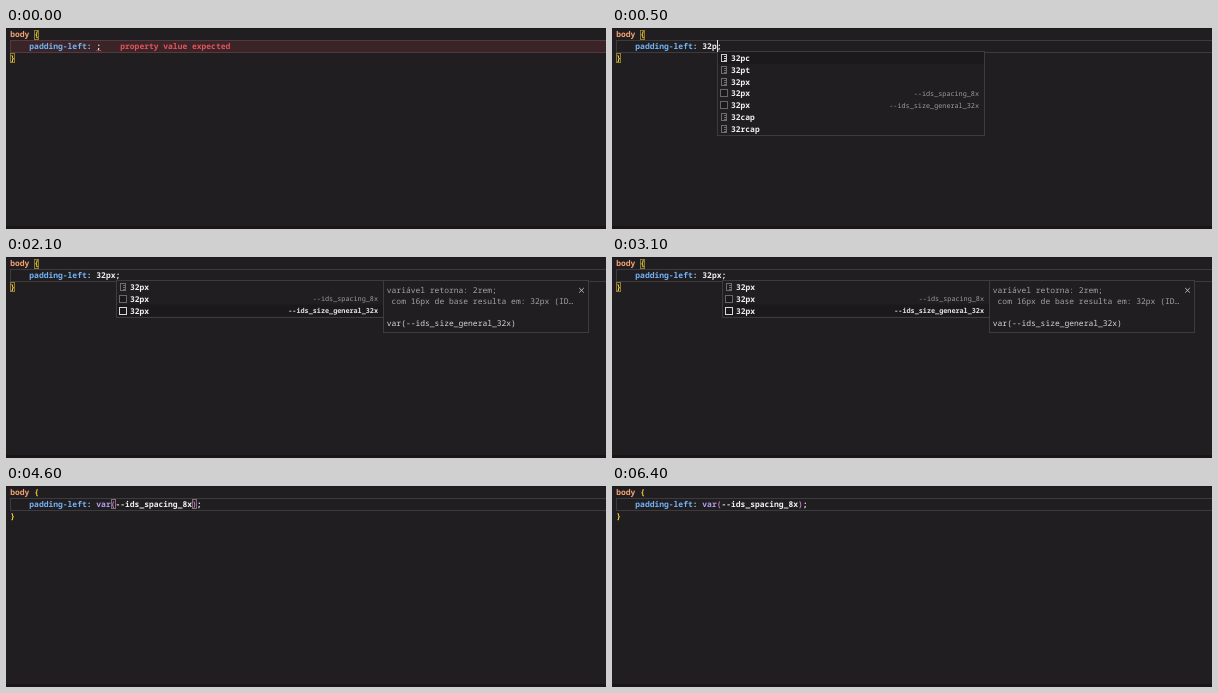
An HTML page with a canvas for the animation above (6.5 s loop, 600x201 px).

```html
<!DOCTYPE html>
<html lang="en">
<head>
<meta charset="utf-8">
<title>CSS variable completion</title>
<style>
html, body { margin: 0; width: 100%; height: 100%; overflow: hidden; background: #201e20; }
canvas { display: block; width: 600px; height: 201px; }
</style>
</head>
<body>
<canvas id="stage"></canvas>
<script>
const W = 600, H = 201, LOOP = 6500;
const CHAR = 4.785, LEFT = 4.2, ROW = 11.75;
const FAMILY = '"Noto Sans Mono", "DejaVu Sans Mono", monospace';
const C = {
  bg: '#201e20', tag: '#f7a473', gold: '#f2cc3a', prop: '#74b4f8', white: '#f0f0f0',
  func: '#b69cf0', paren: '#c678c4', error: '#e2545b', grey: '#9c9a9c', border: '#3d3b3d'
};

const canvas = document.getElementById('stage');
const ctx = canvas.getContext('2d');
const dpr = window.devicePixelRatio || 1;
canvas.width = W * dpr;
canvas.height = H * dpr;
ctx.scale(dpr, dpr);
ctx.textRendering = 'geometricPrecision';

const col = n => LEFT + n * CHAR;
const within = (t, spans) => spans.some(([a, b]) => t >= a && t < b);

function fill(x, y, w, h, color) {
  ctx.fillStyle = color;
  ctx.fillRect(x, y, w, h);
}

function frame(x, y, w, h, color) {
  ctx.strokeStyle = color;
  ctx.lineWidth = 1;
  ctx.strokeRect(x + 0.5, y + 0.5, w - 1, h - 1);
}

function text(str, x, y, color, { weight = 700, size = CHAR / 0.6, align = 'left' } = {}) {
  ctx.font = `${weight} ${size}px ${FAMILY}`;
  ctx.textAlign = align;
  ctx.fillStyle = color;
  ctx.fillText(str, x, y);
}

// Draws coloured pieces one after another on the character grid.
function code(start, y, ...parts) {
  let n = start;
  for (const [str, color] of parts) {
    text(str, col(n), y, color);
    n += str.length;
  }
  return n;
}

function caret(n) {
  fill(Math.round(col(n)), 12, 1, 12, '#e6e6e6');
}

function bracketBox(n, y, color) {
  frame(Math.round(col(n)), y, 5, 10, color);
}

function squiggle(x, y) {
  ctx.strokeStyle = C.error;
  ctx.lineWidth = 0.8;
  ctx.beginPath();
  ctx.moveTo(x, y + 1);
  for (let i = 1; i <= 4; i++) ctx.lineTo(x + i * 1.2, y + (i % 2 ? 0 : 1));
  ctx.stroke();
}

function icon(kind, x, y, active) {
  if (kind === 'swatch') {
    fill(x, y, 8, 8, '#1a181a');
    frame(x, y, 8, 8, active ? '#d8d8d8' : '#686668');
    return;
  }
  const color = active ? '#c8c8c8' : '#6e6c6e';
  frame(x + 1, y, 6, 8, color);
  for (let i = 2; i < 7; i += 2) fill(x + 4, y + i, 2, 1, color);
}

function list(x, y, w, items, selected) {
  const h = Math.round(items.length * ROW) + 3;
  fill(x, y, w, h, C.bg);
  items.forEach(([label, kind, detail], i) => {
    const top = y + 1 + i * ROW, active = i === selected;
    if (active) fill(x + 1, top, w - 2, ROW, '#1b191c');
    icon(kind, x + 3, Math.round(top + 2), active);
    text(label, x + 14, top + 9.2, C.white);
    if (detail) {
      text(detail, x + w - 6, top + 8.6, active ? '#e4e4e4' : C.grey,
        { size: 6.8, weight: active ? 700 : 500, align: 'right' });
    }
  });
  frame(x, y, w, h, C.border);
}

function panel(name) {
  const soft = { weight: 500 };
  fill(377, 23, 206, 53, C.bg);
  frame(377, 23, 206, 53, C.border);
  text('variável retorna: 2rem;', 380.8, 36, '#a3a2a3', soft);
  text(' com 16px de base resulta em: 32px (ID…', 380.8, 47, '#a3a2a3', soft);
  text(`var(${name})`, 380.8, 69, '#d6d6d6', soft);
  ctx.strokeStyle = '#c8c8c8';
  ctx.lineWidth = 0.9;
  ctx.beginPath();
  ctx.moveTo(573.2, 31); ctx.lineTo(577.8, 35.6);
  ctx.moveTo(577.8, 31); ctx.lineTo(573.2, 35.6);
  ctx.stroke();
}

const SPACING = '--ids_spacing_8x', SIZE = '--ids_size_general_32x';
const VARS = [['32px', 'swatch', SPACING], ['32px', 'swatch', SIZE]];
const SHORT = [['32px', 'unit'], ...VARS];
const LONG = [['32pc', 'unit'], ['32pt', 'unit'], ['32px', 'unit'], ...VARS,
  ['32cap', 'unit'], ['32rcap', 'unit']];

const CARET_TYPING = [[100, 1200], [1500, 2000], [2200, 3100], [4000, 4100]];
const CARET_DONE = [[4100, 4600], [5100, 5500], [6000, 6300]];

function typed(t) {
  if (t < 100) return '';
  if (t < 200) return '3';
  if (t < 500) return '32';
  return t < 600 ? '32p' : '32px';
}

function draw(t) {
  const invalid = t < 500, done = t >= 4100;

  fill(0, 0, W, H, C.bg);
  fill(0, 0, W, 1, '#1c1a1c');
  fill(0, 198, W, 3, '#1a1618');

  if (invalid) fill(4, 12, W - 4, 12, '#3a2427');
  frame(4, 12, W, 13, invalid ? '#56393c' : '#3d3b3d');

  code(0, 9, ['body ', C.tag], ['{', C.gold]);
  code(0, 33, ['}', C.gold]);
  if (!done) {
    bracketBox(5, 2, '#8d7c2c');
    bracketBox(0, 25, '#8d7c2c');
  }

  const value = code(4, 21, ['padding-left', C.prop], [': ', '#a9c8e8']);

  if (done) {
    code(value, 21, ['var', C.func], ['(', C.paren], [SPACING, C.white], [')', C.paren], [';', C.white]);
    if (t < 6300) {
      bracketBox(value + 3, 13, '#7b717b');
      bracketBox(value + 20, 13, '#7b717b');
    }
    if (within(t, CARET_DONE)) caret(value + 21);
    return;
  }

  const end = code(value, 21, [typed(t), C.white]);
  text(';', col(end), 21, C.white);
  if (invalid) {
    squiggle(col(end), 22);
    text('property value expected', col(end + 5), 21, C.error);
  } else if (t < 600) {
    list(105, 23, 268, LONG, 0);
  } else {
    const selected = t < 1200 ? 0 : t >= 2100 && t < 3200 ? 2 : 1;
    list(110, 23, 268, SHORT, selected);
    if (selected) panel(SHORT[selected][2]);
  }
  if (within(t, CARET_TYPING)) caret(end);
}

const start = performance.now();
function tick() {
  draw((performance.now() - start) % LOOP);
  requestAnimationFrame(tick);
}
draw(0);
requestAnimationFrame(tick);
</script>
</body>
</html>
```
